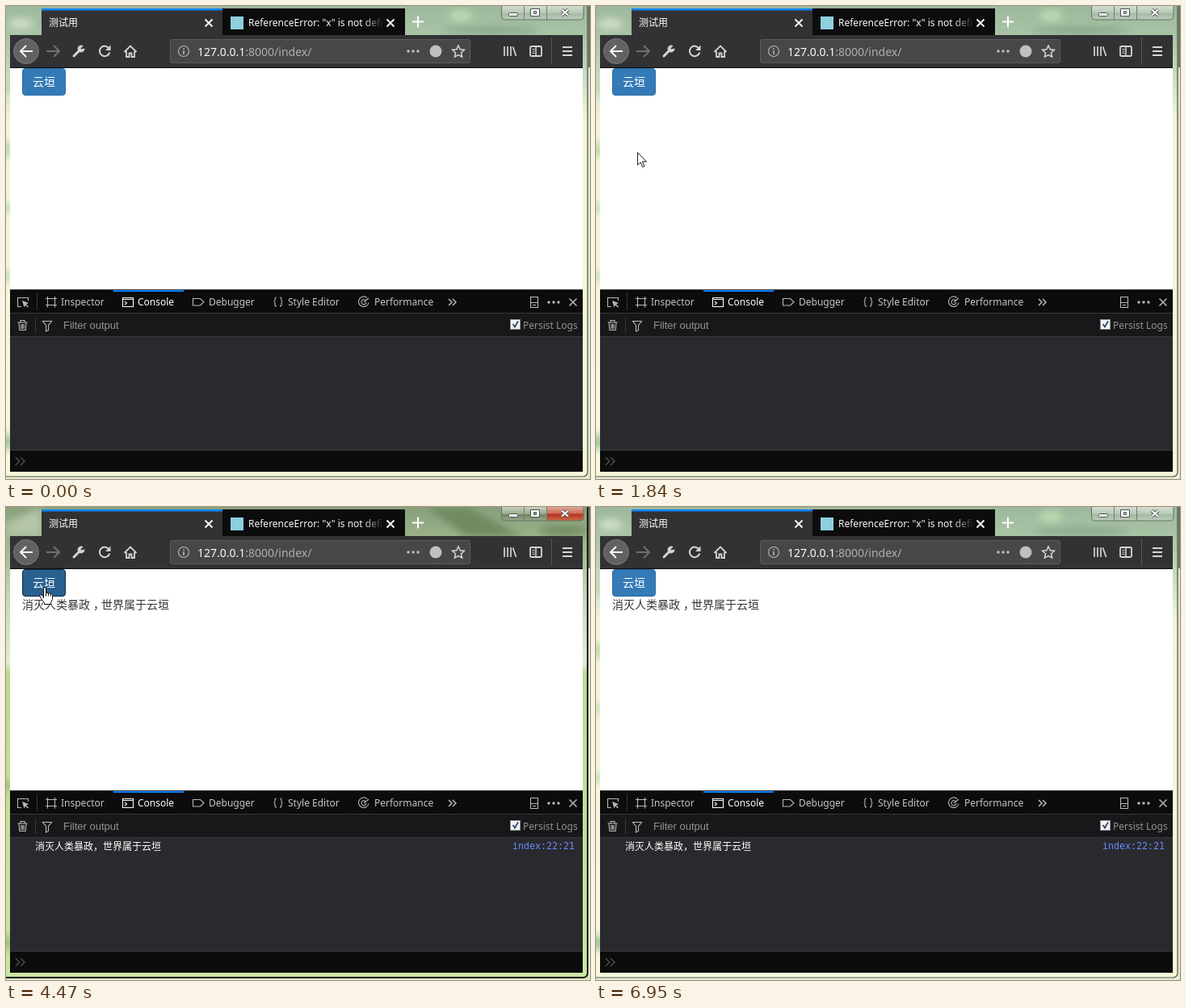
Animation of 723x586 px, one loop 7100 ms. Source, as an HTML page:

```html
<!DOCTYPE html>
<html lang="zh">
<head>
<meta charset="utf-8">
<title>测试用</title>
<style>
html, body { margin: 0; width: 100%; height: 100%; overflow: hidden; background: #fff; }
svg { display: block; }
text { font: 12px "Noto Sans", "Noto Sans CJK SC", sans-serif; white-space: pre; }
.cjk { font-family: "Noto Sans CJK SC", sans-serif; }
.big { font-size: 14px; }
.line { fill: none; stroke: #b8b8ba; stroke-width: 1.1; }
.tool { fill: none; stroke: #d5d5d6; stroke-width: 2; }
.label { fill: #c6c6c8; }
.strong { font-weight: 500; }

/* hard cuts on one 7.1 s clock */
.arrow, .hand, .btn, .tip, .active, .reply, .log {
  animation: 7.1s step-end infinite;
}
.arrow { animation-name: arrow; }
.hand { animation-name: hand; }
.btn { animation-name: btn; }
.tip { animation-name: tip; }
.active { animation-name: active; }
.reply { animation-name: reply; }
.log { animation-name: log; }

@keyframes arrow {
  0% { transform: translate(-40px, 0); }
  .98% { transform: translate(583px, 533px); }
  1.91% { transform: translate(495px, 463px); }
  2.84% { transform: translate(398px, 382px); }
  3.77% { transform: translate(303px, 301px); }
  4.7% { transform: translate(222px, 231px); }
  5.63% { transform: translate(159px, 183px); }
  8.02% { transform: translate(79px, 150px); }
  9.43% { transform: translate(48px, 130px); }
  10.98% { transform: translate(38px, 120px); }
  12.39% { transform: translate(42px, 126px); }
  14.78% { transform: translate(-40px, 0); }
  23.38% { transform: translate(99px, 138px); }
  24.64% { transform: translate(70px, 166px); }
  25.91% { transform: translate(51px, 181px); }
  26.9% { transform: translate(54px, 191px); }
  29.01% { transform: translate(48px, 175px); }
  30.98% { transform: translate(46px, 144px); }
  32.04% { transform: translate(46px, 115px); }
  33.09% { transform: translate(-40px, 0); }
  79.29% { transform: translate(182px, 153px); }
  80.42% { transform: translate(330px, 164px); }
  81.4% { transform: translate(490px, 178px); }
  82.39% { transform: translate(658px, 198px); }
  83.52% { transform: translate(-40px, 0); }
  85.91% { transform: translate(684px, 477px); }
  86.97% { transform: translate(695px, 510px); }
  88.02% { transform: translate(704px, 540px); }
  89.08% { transform: translate(711px, 565px); }
  90.14%, 100% { transform: translate(-40px, 0); }
}
@keyframes hand {
  0% { transform: translate(-40px, 0); }
  14.78% { transform: translate(43px, 88px); }
  23.38% { transform: translate(-40px, 0); }
  33.09% { transform: translate(42px, 103px); }
  36.33% { transform: translate(41px, 99px); }
  79.29%, 100% { transform: translate(-40px, 0); }
}
@keyframes btn {
  0%, 23.38% { fill: #337ab7; stroke: #2e6da4; }
  14.78%, 33.09% { fill: #286090; stroke: #204d74; }
  59.43% { fill: #204d74; stroke: #122b40; }
  61.54% { fill: #286090; stroke: #122b40; }
  97.88%, 100% { fill: #337ab7; stroke: #2e6da4; }
}
@keyframes tip {
  0% { visibility: hidden; }
  44.78% { visibility: visible; }
  59.43%, 100% { visibility: hidden; }
}
@keyframes active {
  0% { visibility: hidden; }
  58.3% { visibility: visible; }
  97.88%, 100% { visibility: hidden; }
}
@keyframes reply {
  0% { visibility: hidden; }
  61.54%, 100% { visibility: visible; }
}
@keyframes log {
  0% { visibility: hidden; }
  62.95%, 100% { visibility: visible; }
}
</style>
</head>
<body>
<svg width="723" height="586">
  <defs>
    <linearGradient id="pale" x2="0" y2="1">
      <stop stop-color="#9db89c"/><stop offset=".06" stop-color="#a9c3a5"/>
      <stop offset=".15" stop-color="#c9dcc0"/><stop offset=".24" stop-color="#f3f5d6"/>
      <stop offset="1" stop-color="#f7f8d9"/>
    </linearGradient>
    <linearGradient id="lush" x2="0" y2="1">
      <stop stop-color="#87a07b"/><stop offset=".07" stop-color="#9db48c"/>
      <stop offset=".2" stop-color="#c9d9bb"/><stop offset=".33" stop-color="#e2ebd3"/>
      <stop offset=".35" stop-color="#bcd990"/><stop offset="1" stop-color="#cbe6a2"/>
    </linearGradient>
    <linearGradient id="grey" x2="0" y2="1">
      <stop stop-color="#d3ded2"/><stop offset=".5" stop-color="#b7c8b6"/>
      <stop offset=".52" stop-color="#a3b7a2"/><stop offset="1" stop-color="#bccdba"/>
    </linearGradient>
    <linearGradient id="red" x2="0" y2="1">
      <stop stop-color="#e0a797"/><stop offset=".48" stop-color="#cb6a54"/>
      <stop offset=".52" stop-color="#b1331d"/><stop offset="1" stop-color="#cf6a48"/>
    </linearGradient>
    <linearGradient id="dim" x2="0" y2="1">
      <stop stop-color="#c6d0bc"/><stop offset=".5" stop-color="#9aaa8f"/>
      <stop offset=".52" stop-color="#6d7f64"/><stop offset="1" stop-color="#98aa8a"/>
    </linearGradient>
    <linearGradient id="tipFill" x2="0" y2="1">
      <stop stop-color="#fff"/><stop offset="1" stop-color="#e4e5f0"/>
    </linearGradient>
    <linearGradient id="fade">
      <stop stop-color="#0c0c0d" stop-opacity="0"/><stop offset="1" stop-color="#0c0c0d"/>
    </linearGradient>
    <filter id="soft" x="-50%" y="-50%" width="200%" height="200%"><feGaussianBlur stdDeviation="5"/></filter>
    <path id="x" d="M-4.5-4.5l9 9m0-9l-9 9"/>
    <path id="more" d="M-5-4l4 4-4 4M0-4l4 4-4 4"/>
    <path id="rim" d="M720 0V577q0 6-6 6H0" fill="none"/>
    <g id="dots"><circle cx="-6" r="1.7"/><circle r="1.7"/><circle cx="6" r="1.7"/></g>
    <g id="caption">
      <path d="M641.500 0v17M669.500 0v17" stroke="#6e7d6d"/>
      <path d="M613.500-1V13q0 4 4 4H711q4 0 4-4V-1" fill="none" stroke="#657265"/>
      <g fill="#fff" stroke="#4a524d">
        <rect x="622.500" y="8.500" width="11" height="4" rx="1"/>
        <path d="M649.500 3.500h11v9h-11zM653.500 6.500v3h3v-3z" fill-rule="evenodd"/>
      </g>
      <g fill="none" transform="translate(692 8)">
        <path d="M-4-3.500l8 7m0-7l-8 7" stroke="#4a524d" stroke-width="4"/>
        <path d="M-4-3.500l8 7m0-7l-8 7" stroke="#fff" stroke-width="2.200"/>
      </g>
    </g>
  </defs>

  <!-- window glass -->
  <rect width="723" height="586" fill="url(#pale)"/>
  <g filter="url(#soft)" fill="#bfdcb2">
    <circle cx="0" cy="100" r="9"/><circle cx="0" cy="178" r="10"/><circle cx="0" cy="250" r="7"/>
    <circle cx="0" cy="335" r="7"/><circle cx="0" cy="540" r="10" fill="#9fc79a"/>
    <ellipse cx="563" cy="12" rx="14" ry="7"/><ellipse cx="18" cy="22" rx="15" ry="7" fill="#d0dec8"/>
    <ellipse cx="600" cy="30" rx="60" ry="5" fill="#8aa88a"/>
  </g>
  <path d="M613 0H715V13q0 4-4 4H617q-4 0-4-4z" fill="url(#grey)"/>
  <use href="#caption"/>
  <use href="#rim" stroke="#4a5148" stroke-width="1.200"/>
  <g class="active">
    <rect width="723" height="586" fill="url(#lush)"/>
    <g filter="url(#soft)">
      <path d="M520 0l50 36h70L570 0z" fill="#6f8a62"/>
      <path d="M0 20L44 0V36H0z" fill="#b5c5a8"/>
      <ellipse cx="690" cy="29" rx="30" ry="6" fill="#71895f"/>
      <circle cx="0" cy="345" r="8" fill="#9cc47f"/><circle cx="0" cy="540" r="10" fill="#9cc47f"/>
    </g>
    <path d="M613 0H670V17H617q-4 0-4-4z" fill="url(#dim)"/>
    <path d="M670 0h45V13q0 4-4 4H670z" fill="url(#red)"/>
    <use href="#caption"/>
    <use href="#rim" stroke="#1c2118" stroke-width="2"/>
  </g>
  <path d="M722 0V586M0 585.500H723" stroke="#dfe5d8" stroke-width="2"/>
  <path d="M722 0V76" stroke="#66735f" stroke-width="2"/>

  <!-- tabs -->
  <path d="M44 3H268V36H44z" fill="#323234"/>
  <path d="M268 3H494V36H268z" fill="#0c0c0d"/>
  <path d="M44 3H268V5.500H44z" fill="#0a84ff"/>
  <text class="cjk" x="53" y="25" fill="#fff">测试用</text>
  <rect x="278" y="13" width="16" height="16" fill="#8ed0de"/>
  <svg x="300" y="3" width="166" height="33"><text class="strong" y="22" fill="#f9f9fa">ReferenceError: "x" is not defined</text></svg>
  <path d="M442 8H468V34H442z" fill="url(#fade)"/>
  <g fill="none" stroke="#f0f0f1" stroke-width="2">
    <use href="#x" x="251" y="21"/><use href="#x" x="476" y="21"/>
    <path d="M503 19.500h14M510 12.500v14" stroke="#fff"/>
  </g>

  <!-- toolbar -->
  <path d="M5 36H714V76H5z" fill="#323234"/>
  <path d="M5 76.500H714" stroke="#0c0c0d"/>
  <circle cx="25" cy="56" r="15.500" fill="#626264" stroke="#7b7b7d"/>
  <g class="tool">
    <path d="M33 56H18.500M25 49l-7 7 7 7" stroke="#f5f5f6"/>
    <path d="M50 56H65M59 49l7 7-7 7" stroke="#707072"/>
    <path d="M84 62l7-7" stroke-width="3" stroke-linecap="round"/>
    <path d="M95 49.500a4 4 0 1 0 2 3.500l-3.500 1-1.500-1.500z" fill="#d5d5d6" stroke-width="1"/>
    <path d="M127.500 52.500a6.300 6.300 0 1 0 .8 5"/>
    <path d="M129.500 48.500v6.500h-6.500z" fill="#d5d5d6" stroke="none"/>
    <path d="M146.500 57l7.500-7.500 7.500 7.500M149 56v7h3.500v-4.500h3V63h3.500v-7" stroke-width="1.800"/>
  </g>
  <rect x="203.500" y="41.500" width="371" height="29" rx="2" fill="#474749" stroke="#5b5b5d"/>
  <circle class="line" cx="220" cy="56" r="6.500"/>
  <path d="M220 55v5M220 52v1.600" stroke="#b8b8ba" stroke-width="1.600"/>
  <text class="big" x="237" y="62" fill="#f9f9fa">127.0.0.1<tspan fill="#aeaeb0">:8000/index/</tspan></text>
  <use href="#dots" x="504" y="56" fill="#c3c3c5"/>
  <circle cx="532" cy="56" r="7.500" fill="#c0c0c2"/>
  <path class="tool" d="M560 49l2.200 4.800 5.200.6-3.900 3.500 1.100 5.200-4.600-2.600-4.600 2.600 1.100-5.200-3.900-3.500 5.200-.6z" style="stroke-width:1.500"/>
  <g class="tool">
    <path d="M617 50v12M621 50v12M625 50v12M627.500 50.500l4 11.500" stroke-width="1.700"/>
    <rect x="649" y="50" width="14" height="12" rx="1.500" stroke-width="1.800"/>
    <path d="M656 50v12" stroke-width="1.500"/>
    <path d="M651.500 53.500h3M651.500 56h3M651.500 58.500h3" stroke-width="1"/>
    <path d="M675.500 39v34" stroke="#57575a" stroke-width="1"/>
    <path d="M689 51h12M689 56h12M689 61h12"/>
  </g>

  <!-- page -->
  <path d="M5 77H714V351H5z" fill="#fff"/>
  <rect class="btn" x="20.500" y="77.500" width="53" height="33" rx="3.500" fill="#337ab7" stroke="#2e6da4"/>
  <text class="cjk big" x="33" y="99" fill="#fff">云垣</text>
  <text class="cjk big reply" x="20" y="126" fill="#333">消灭人类暴政<tspan dx="4">，</tspan><tspan dx="-4">世界属于云垣</tspan></text>

  <!-- developer tools -->
  <path d="M5 351H714V577H5z" fill="#0c0c0d"/>
  <path d="M5 381H714V409H5z" fill="#18181a"/>
  <path d="M5 410H714V550H5z" fill="#2a2a2e"/>
  <path d="M5 351.500H714M5 380.500H714M5 409.500H714M5 550.500H714M38.500 355v22M36.500 386v19" stroke="#38383d"/>
  <path d="M133 352H220V354H133z" fill="#0a84ff"/>
  <g class="line">
    <path d="M19 372.500H14.500V361.500H27.500V365"/>
    <path d="M20 365l8 3-3 1.500 3 3-1 1-3-3-1.500 3z" fill="#b8b8ba" stroke="none"/>
    <path d="M51.500 362.500h9v8h-9zM49 362.500h2M49 370.500h2M61 362.500h2M61 370.500h2M51.500 360v2M60.500 360v2M51.500 371v2.500M60.500 371v2.500"/>
    <path d="M144.500 361.500h13v11h-13zM144.500 363.500h13M147 366l2.500 2-2.500 2" stroke="#fff"/>
    <path d="M231.500 362.500h9l4.500 4-4.500 4.500h-9z"/>
    <path d="M335 361q-2 0-2 2v2q0 1.500-1.500 1.500 1.500 0 1.500 1.500v2q0 2 2 2M339 361q2 0 2 2v2q0 1.500 1.500 1.500-1.500 0-1.500 1.500v2q0 2-2 2"/>
    <path d="M447 361.500a6.300 6.300 0 1 0 2 6M445 364.500a3 3 0 1 0 1 2.500M443 367l6-5"/>
    <use href="#more" x="553" y="367" stroke-width="1.500"/>
    <path d="M649.500 360.500h9v13h-9zM649.500 367.500h9M652 370.500h4"/>
    <use href="#x" x="702" y="367" stroke-width="1.500"/>
    <path d="M14.500 392h12M18 391.500v-2h5v2M16 392.500l.8 9h7.400l.8-9M18.800 394v6M20.500 394v6M22.200 394v6"/>
    <path d="M45.500 390.500h11l-4 5v6l-3 1.500v-7.500z"/>
    <use href="#more" transform="translate(18 564) scale(1.250)" stroke="#505055"/>
  </g>
  <use href="#dots" x="678" y="367" fill="#b8b8ba"/>
  <g class="label">
    <text x="68" y="371">Inspector</text>
    <text class="strong" x="163" y="371" fill="#fff">Console</text>
    <text x="251" y="371">Debugger</text>
    <text x="349" y="371">Style Editor</text>
    <text x="456" y="371">Performance</text>
  </g>
  <text x="71" y="400" fill="#939397" style="font:13px 'Liberation Sans',sans-serif">Filter output</text>
  <rect x="624.500" y="388.500" width="12" height="12" fill="#f4f4f4" stroke="#8e8f8f"/>
  <path d="M627.500 394l2.500 3.500 4-7" fill="none" stroke="#34466f" stroke-width="1.800"/>
  <text x="640" y="400" fill="#939397">Persist Logs</text>
  <g class="log">
    <text class="cjk" x="36" y="425" fill="#fff">消灭人类暴政，世界属于云垣</text>
    <text x="627" y="424" fill="#6b89ff" style="font:11.630px 'DejaVu Sans Mono',monospace">index:22:21</text>
  </g>

  <g class="tip">
    <rect x="45.500" y="120.500" width="61" height="21" rx="2" fill="url(#tipFill)" stroke="#767676"/>
    <text class="cjk strong" x="52" y="136">点我试试</text>
  </g>
  <path class="arrow" d="M.5.500v15.500l3.600-3.400 2.600 5.900 2.300-1-2.600-5.700h5z" fill="#fff" stroke="#15152a"/>
  <path class="hand" d="M5.500 14V2q0-1.500 1.500-1.500T8.500 2V7.500q1.500-1 3 .5 1.500-.8 2.700.6 2.300-.3 2.300 1.900v5l-2 4v2h-8v-2l-3-3.500-2.500-4.500q-.8-1.800 1-2 1.500 0 3.500 3zM8.500 7.500v4M11.500 8v3.500M14.200 8.600v3" fill="#fff" stroke="#111"/>
</svg>
</body>
</html>
```
